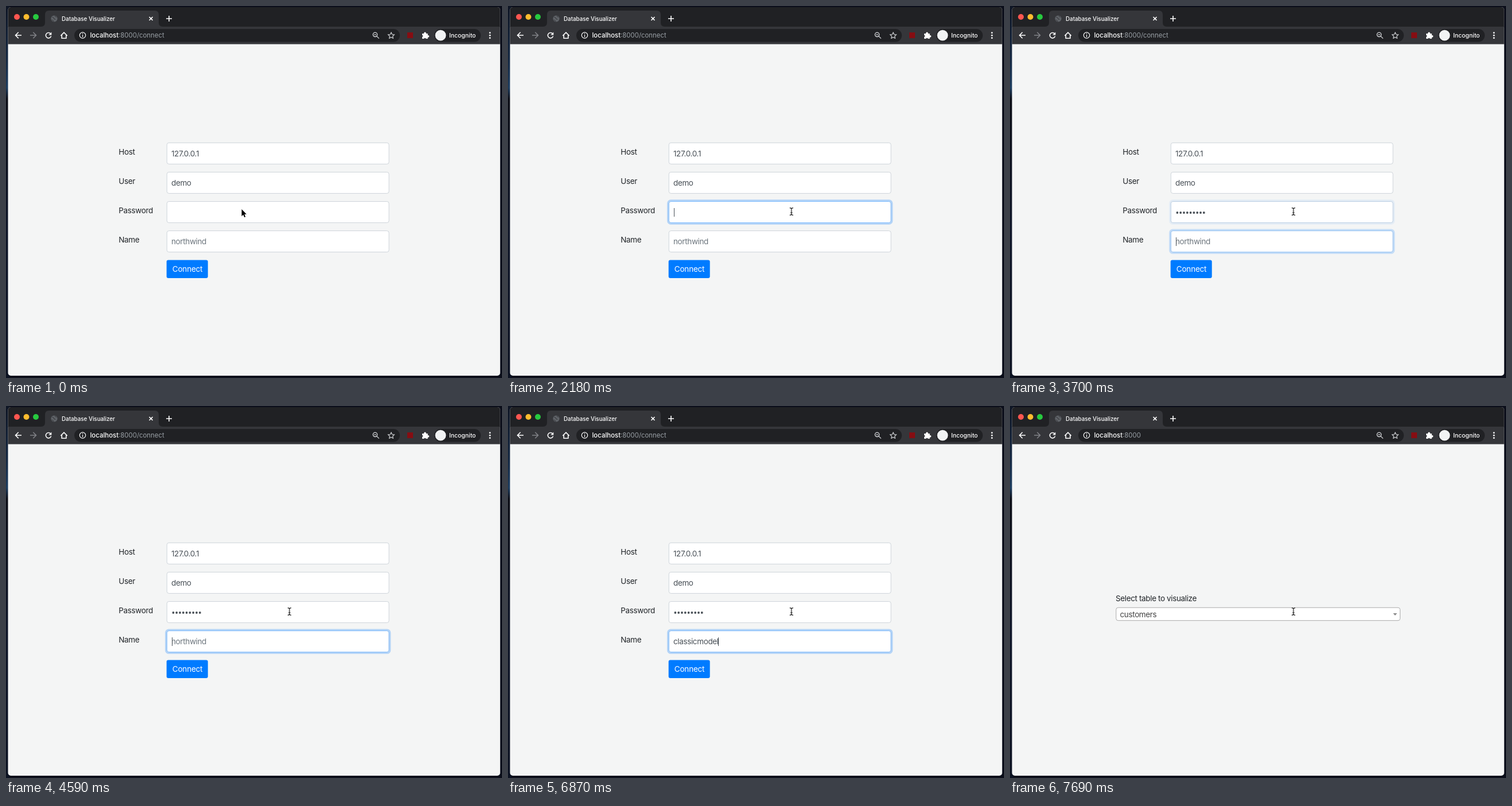
Recreate the animation shown at these times as an HTML page. Size 864 by 648 pixels, loop 8 s.

```html
<!DOCTYPE html>
<html lang="en">
<head>
<meta charset="utf-8">
<title>Database Visualizer</title>
<style>
html, body { margin: 0; width: 100%; height: 100%; overflow: hidden; background: #0b0d16; }
svg { display: block; width: 864px; height: 648px; }
text { white-space: pre; }
.ui { font: 500 11.4px Inter, Roboto, sans-serif; fill: #fff; }
.small { font-size: 9.8px; }
.page { font: 13.5px Inter, Roboto, sans-serif; letter-spacing: -.37px; fill: #212529; }
.value { fill: #495057; }
.hint { fill: #6c757d; }
.dim { fill: #9aa0a6; font-weight: 400; }
.icon { fill: none; stroke: #fff; stroke-width: 1.6; }
.field { fill: #fff; stroke: #ced4da; }

.anim { animation: 8s step-end infinite; }
#passFocus { animation-name: pass; }
#nameFocus { animation-name: name; }
#btnFocus { animation-name: btn; }
#form, #path { animation-name: leave; }
#pick { animation-name: enter; }
#arrow { animation-name: arrow; }
#beam { animation-name: beam; animation-timing-function: ease-in-out; }

@keyframes pass {
  0%, 15% { opacity: 0; }
  15.375% { opacity: .12; }
  16.125% { opacity: .6; }
  16.375%, 45.25% { opacity: 1; }
  46% { opacity: .6; }
  46.25% { opacity: .25; }
  46.625%, 100% { opacity: 0; }
}
@keyframes name {
  0% { opacity: 0; }
  46% { opacity: .4; }
  46.25% { opacity: .75; }
  46.625% { opacity: 1; }
  90.375% { opacity: 1; animation-timing-function: ease-in-out; }
  92.125%, 100% { opacity: 0; }
}
@keyframes btn {
  0% { opacity: 0; }
  90.375% { opacity: 0; animation-timing-function: ease-in-out; }
  92.125%, 100% { opacity: 1; }
}
@keyframes leave {
  0% { visibility: visible; }
  93.875%, 100% { visibility: hidden; }
}
@keyframes enter {
  0% { visibility: hidden; }
  95%, 100% { visibility: visible; }
}
@keyframes arrow {
  0% { visibility: visible; }
  1%, 100% { visibility: hidden; }
}
@keyframes beam {
  0% { transform: translate(412px, 358px); opacity: 0; animation-timing-function: step-end; }
  1% { transform: translate(413px, 358px); opacity: 1; }
  3.5%, 6.75% { transform: translate(457px, 358px); opacity: 1; }
  8.625%, 100% { transform: translate(493.7px, 358px); opacity: 1; }
}
</style>
</head>
<body>
<svg viewBox="0 0 864 648">
  <defs>
    <linearGradient id="sky" x2="0" y2="1">
      <stop offset="0" stop-color="#0e1524"/>
      <stop offset=".15" stop-color="#162a45"/>
      <stop offset=".22" stop-color="#1d3d60"/>
      <stop offset=".25" stop-color="#0b0d16"/>
      <stop offset=".6" stop-color="#10172a"/>
      <stop offset="1" stop-color="#0c1222"/>
    </linearGradient>
    <clipPath id="win"><rect x="3.5" y="2" width="857.3" height="642" rx="5"/></clipPath>
    <rect id="field" class="field" x="280.3" y="238.3" width="386.8" height="37" rx="3.5"/>
    <g id="glow" fill="none">
      <rect x="278.5" y="236.5" width="390.4" height="40.6" rx="5" stroke="#007bff" stroke-opacity=".27" stroke-width="2.8"/>
      <rect x="280.3" y="238.3" width="386.8" height="37" rx="3.5" stroke="#80bdff"/>
    </g>
    <path id="ibeam" d="M-3-6.3q3 0 3 2V4.3q0 2-3 2M3-6.3q-3 0-3 2M3 6.3q-3 0-3-2M-1.7 2h3.4"/>
  </defs>

  <rect width="864" height="648" fill="#0b0e1a"/>
  <rect width="6" height="648" fill="url(#sky)"/>

  <g clip-path="url(#win)">
    <rect width="864" height="648" fill="#f4f5f5"/>
    <rect width="864" height="37" fill="#202124"/>
    <rect y="36" width="864" height="30.5" fill="#35363a"/>
    <path d="M61 36q7 0 7-7V15q0-7 7-7H259q7 0 7 7v14q0 7 7 7z" fill="#35363a"/>
  </g>

  <!-- tab strip -->
  <circle cx="19" cy="19" r="5" fill="#ff5650"/>
  <circle cx="35.5" cy="19" r="5" fill="#fdbc2e"/>
  <circle cx="52" cy="19" r="5" fill="#27c93f"/>
  <circle cx="84" cy="22" r="5.6" fill="#5f6368"/>
  <path d="M80 19.5q3 0 3.5 2t3 1.5M83 27q-.5-2-3.5-3M85.5 17q-.5 2 3 2.5" fill="none" stroke="#3c3d41" stroke-width="1.2"/>
  <text class="ui small" x="97" y="25.6">Database Visualizer</text>
  <path class="icon" d="M249.5 19l6 6m0-6l-6 6M279 22h10m-5-5v10"/>

  <!-- toolbar -->
  <path class="icon" d="M27 51H16.5M21.7 45.8L16.5 51l5.2 5.2"/>
  <path class="icon" d="M42 51h10.5M47.3 45.8l5.2 5.2-5.2 5.2" style="stroke:#808286"/>
  <path class="icon" d="M78 48.6A4.7 4.7 0 1 0 78.6 52.4"/>
  <path d="M79.3 45.4v5h-5z" fill="#fff"/>
  <path class="icon" d="M95.3 51.8L101 46.2l5.7 5.6M97.2 50.5v5.8h7.6v-5.8"/>

  <rect x="119" y="40" width="567" height="22.5" rx="11.2" fill="#202124"/>
  <circle class="icon" cx="133.5" cy="51" r="5.2" style="stroke-width:1.2"/>
  <path class="icon" d="M133.5 50.2v3.8M133.5 47.7v1.4" style="stroke-width:1.3"/>
  <text class="ui" x="146.5" y="55.2">localhost<tspan class="dim">:8000</tspan><tspan id="path" class="dim anim">/connect</tspan></text>
  <g class="icon" style="stroke:#d5d7da;stroke-width:1.3">
    <circle cx="643" cy="49.8" r="3.7"/>
    <path d="M645.8 52.6l4 4M641.2 49.8h3.6"/>
    <path d="M671 46l1.6 3.5 3.8.4-2.8 2.6.8 3.8-3.4-1.9-3.4 1.9.8-3.8-2.8-2.6 3.8-.4z" style="stroke-width:1.1"/>
  </g>
  <rect x="699" y="46" width="10" height="10" fill="#850d12"/>
  <path d="M725 48h3.1a1.9 1.9 0 1 1 3.6 0h3v3a1.9 1.9 0 1 1 0 3.6V57h-3.2a1.7 1.7 0 0 0-3.3 0H725v-3a1.7 1.7 0 0 0 0-3.3z" fill="#fff"/>
  <rect x="746" y="40" width="81" height="22.5" rx="11.2" fill="#202124"/>
  <circle cx="757" cy="51.2" r="9.4" fill="#f1f3f4"/>
  <text class="ui" x="772" y="55" style="font-size:10.4px">Incognito</text>
  <g fill="#fff">
    <circle cx="843" cy="46.7" r="1.4"/>
    <circle cx="843" cy="51.2" r="1.4"/>
    <circle cx="843" cy="55.7" r="1.4"/>
  </g>

  <g id="form" class="page anim">
    <text x="196.3" y="258.8">Host</text>
    <text x="196.3" y="310">User</text>
    <text x="196.3" y="361.2">Password</text>
    <text x="196.3" y="412.4">Name</text>
    <use href="#field"/>
    <use href="#field" y="51.1"/>
    <use href="#field" y="102.2"/>
    <use href="#field" y="153.3"/>
    <g id="passFocus" class="anim"><use href="#glow" y="102.2"/></g>
    <g id="nameFocus" class="anim"><use href="#glow" y="153.3"/></g>
    <text class="value" x="288" y="262">127.0.0.1</text>
    <text class="value" x="288" y="313">demo</text>
    <line id="dots" x1="291.4" y1="360" y2="360" stroke="#495057" stroke-width="3.8" stroke-linecap="round" stroke-dasharray="0 5.8"/>
    <text id="hint" class="hint" x="288" y="415.4">northwind</text>
    <text id="typed" class="value" x="288" y="415.4"></text>
    <rect id="caret" width="1" height="15" fill="#495057"/>
    <rect x="279.7" y="442.4" width="72" height="31.6" rx="3" fill="#007bff"/>
    <g id="btnFocus" class="anim">
      <rect x="278.3" y="441" width="74.8" height="34.4" rx="4.4" fill="none" stroke="#268fff" stroke-opacity=".5" stroke-width="2.8"/>
      <rect x="279.7" y="442.4" width="72" height="31.6" rx="3" fill="#0069d9"/>
    </g>
    <text x="289.8" y="463.2" style="fill:#fff;letter-spacing:-.2px">Connect</text>
  </g>

  <g id="pick" class="page anim">
    <text x="184" y="339.6">Select table to visualize</text>
    <rect x="184.8" y="351.2" width="494.7" height="22.5" rx="3.5" fill="#fff" stroke="#aaa"/>
    <text x="191.5" y="368.2" style="fill:#444">customers</text>
    <path d="M667.3 361h7l-3.5 4z" fill="#888"/>
  </g>

  <path id="arrow" class="anim" transform="translate(410.5 354)" d="M0 0V12.2L2.8 9.6 4.7 14 6.7 13.2 4.8 8.8H8.4Z" stroke="#fff" stroke-width="1.4" paint-order="stroke"/>
  <g id="beam" class="anim" fill="none">
    <use href="#ibeam" stroke="#fff" stroke-width="2.6" stroke-opacity=".8"/>
    <use href="#ibeam" stroke="#111" stroke-width="1.2"/>
  </g>
</svg>
<script>
const LOOP = 8000, PITCH = 5.8, WORD = 'classicmodels';
const passKeys = [2660, 2750, 2830, 2920, 3070, 3140, 3220, 3300, 3480];
const nameKeys = [5300, 5410, 5520, 5630, 5750, 6130, 6280, 6460, 6560, 6660, 6770, 6870, 7020];
const FOCUS = 1200, TAB = 3620, BLUR = 7230;
const blinks = [[1700, 2180], [4110, 4590], [5100, 5300]];

const [dots, hint, typed, caret] =
  ['dots', 'hint', 'typed', 'caret'].map(id => document.getElementById(id));
const pressed = (keys, t) => keys.filter(k => k <= t).length;
const show = (el, on) => { el.style.display = on ? '' : 'none'; };

function draw(t) {
  const stars = pressed(passKeys, t), letters = pressed(nameKeys, t);
  show(dots, stars);
  dots.setAttribute('x2', 291.5 + PITCH * (stars - 1));
  show(hint, !letters);
  typed.textContent = WORD.slice(0, letters);

  const inName = t >= TAB;
  const x = inName
    ? Math.max(289, Math.floor(288 + (letters ? typed.getComputedTextLength() : 0)))
    : Math.floor(289 + PITCH * stars);
  caret.setAttribute('x', x);
  caret.setAttribute('y', inName ? 403 : 352);
  show(caret, t >= FOCUS && t < BLUR && !blinks.some(([a, b]) => t >= a && t < b));
}

const start = performance.now();
function tick() {
  draw((performance.now() - start) % LOOP);
  requestAnimationFrame(tick);
}
tick();
</script>
</body>
</html>
```
